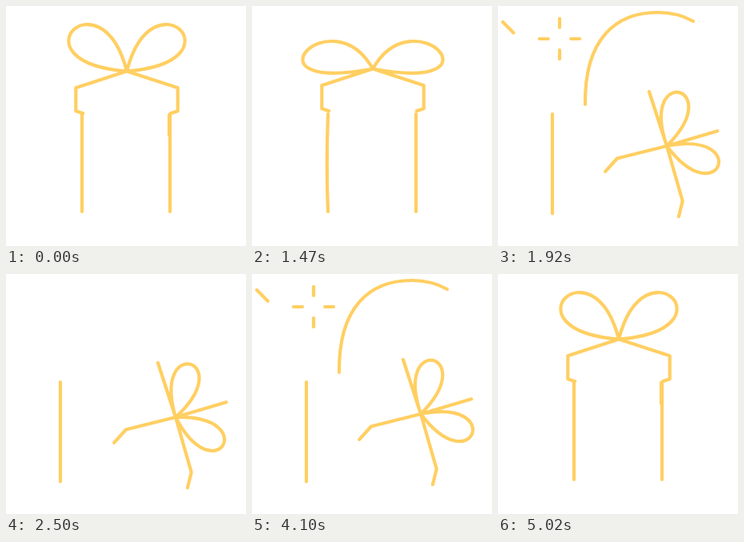
Write an HTML page that moves like this. It is 300 px wide and 300 px high and loops after 5050 ms.

```html
<!DOCTYPE html>
<html lang="en">
<head>
<meta charset="utf-8">
<title>Gift box</title>
<style>
  html, body { margin: 0; width: 100%; height: 100%; overflow: hidden; background: #fff; }
  svg { display: block; width: 100%; height: 100%; }
  path { fill: none; stroke: #ffcf62; stroke-width: 4.2; stroke-linecap: round; stroke-linejoin: round; }
</style>
</head>
<body>
<svg viewBox="0 0 300 300">
  <path id="box"/>
  <path id="lid"/>
  <path id="rays"/>
  <path id="streak"/>
  <path id="arc" pathLength="1" d="M109 123C108 40 148 8 200 8Q224 8 244 19"/>
</svg>
<script>
const LOOP = 5050, MIRROR = 6020;

const phase = (u, from, to) => Math.min(1, Math.max(0, (u - from) / (to - from)));
const smooth = x => x * x * (3 - 2 * x);
const easeOut = x => 1 - (1 - x) * (1 - x);
const mix = (a, b, k) => a + (b - a) * k;
const mixPoint = (a, b, k) => [mix(a[0], b[0], k), mix(a[1], b[1], k)];
const add = (a, b) => [a[0] + b[0], a[1] + b[1]];
const polar = (degrees, length) => {
  const a = degrees * Math.PI / 180;
  return [length * Math.cos(a), length * Math.sin(a)];
};
const str = points => points.map(p => p[0].toFixed(2) + ' ' + p[1].toFixed(2)).join(' ');
const line = (...points) => 'M' + str(points);
const set = (id, d) => document.getElementById(id).setAttribute('d', d);

// Two mirrored loops, each one cubic that leaves the knot and returns to it.
function bow(knot, squash, turn, settle) {
  const tilt = turn * mix(62, 68, settle);
  const spread = mix(mix(50, 65, squash), mix(49, 52.5, settle), turn);
  const open = mix(35.5, 32, turn);
  const size = mix(138, 108, turn);
  const lean = mix(0.06, 0.24, squash) * (1 - turn);
  return [-1, 1].map(side => {
    const handle = (angle, length) => add(knot, polar(tilt + side * angle - 90, length));
    return line(knot) + 'C' + str([
      handle(spread - open, size * (1 - lean)),
      handle(spread + open, size * (1 + lean)),
      knot
    ]);
  }).join('');
}

// A ribbon from the knot to the lid's edge, over it, and in under the lip.
function arm(knot, angle, length, dropAngle, drop, lip) {
  const edge = add(knot, polar(angle, length));
  const hem = add(edge, polar(dropAngle, drop));
  return line(knot, edge, hem, add(hem, [lip, Math.abs(lip) / 3]));
}

function drawLid(squash, flight, settle) {
  const k = smooth(flight);
  const start = [151, mix(81.5, 78.5, squash)];
  const end = mixPoint([211, 175], [212, 179], settle);
  const knot = mixPoint(start, end, flight);
  knot[1] -= 180 * flight * (1 - flight);

  const reach = mix(67, 71.5, k), lip = 9 * (1 - k);
  set('lid', bow(knot, squash, k, settle)
    + arm(knot, mix(162, 252, k), reach, 90, 29 * (1 - k), lip)
    + arm(knot, mix(18, 74, k), reach, mix(90, 104, k), mix(29, 20, k), -lip)
    + arm(knot, mix(90, 166, k), 64 * k, 132, 22 * k, 0)
    + arm(knot, mix(-90, -16.5, k), 66 * k, 0, 0, 0));
}

function drawBox(squash, flight) {
  const k = smooth(flight);
  const left = mix(95, 68, k), right = mix(205, 195, k), bottom = mix(257, 259.5, k);
  const bend = 2.5 * squash * (1 - k);
  let d = line([left, 135]) + 'Q' + str([[left - bend, 200], [left, bottom]]);
  if (k < 0.95) d += line([right, mix(135, 258, k)], [right, bottom]);
  if (squash < 0.05) d += line([204, 136], [204, 162]);
  set('box', d);
}

function drawSparks(u) {
  const outer = 27 * easeOut(phase(u, 1640, 2020));
  const inner = 27 * phase(u, 1700, 2120);
  let d = '';
  if (outer > inner) {
    for (let angle = 0; angle < 360; angle += 90)
      d += line(add([77, 41], polar(angle, inner)), add([77, 41], polar(angle, outer)));
  }
  set('rays', d);

  const along = k => mixPoint([109, 123], [6, 20], k);
  const head = easeOut(phase(u, 1550, 1850)), tail = easeOut(phase(u, 1595, 2105));
  set('streak', head > tail ? line(along(tail), along(head)) : '');

  const arc = document.getElementById('arc');
  const to = easeOut(phase(u, 1560, 1890)), from = smooth(phase(u, 1920, 2220));
  arc.style.visibility = to > from ? 'visible' : 'hidden';
  arc.setAttribute('stroke-dasharray', Math.max(0, to - from) + ' 2');
  arc.setAttribute('stroke-dashoffset', -from);
}

function draw(now) {
  const t = now % LOOP;
  const u = Math.min(t, MIRROR - t, 2500);   // opens, waits, then plays backwards
  const squash = smooth(phase(u, 1010, 1470));
  const flight = phase(u, 1500, 1890);
  drawBox(squash, flight);
  drawLid(squash, flight, easeOut(phase(u, 1920, 2500)));
  drawSparks(u);
}

const begin = performance.now();
function frame() {
  draw(performance.now() - begin);
  requestAnimationFrame(frame);
}
frame();
</script>
</body>
</html>
```
